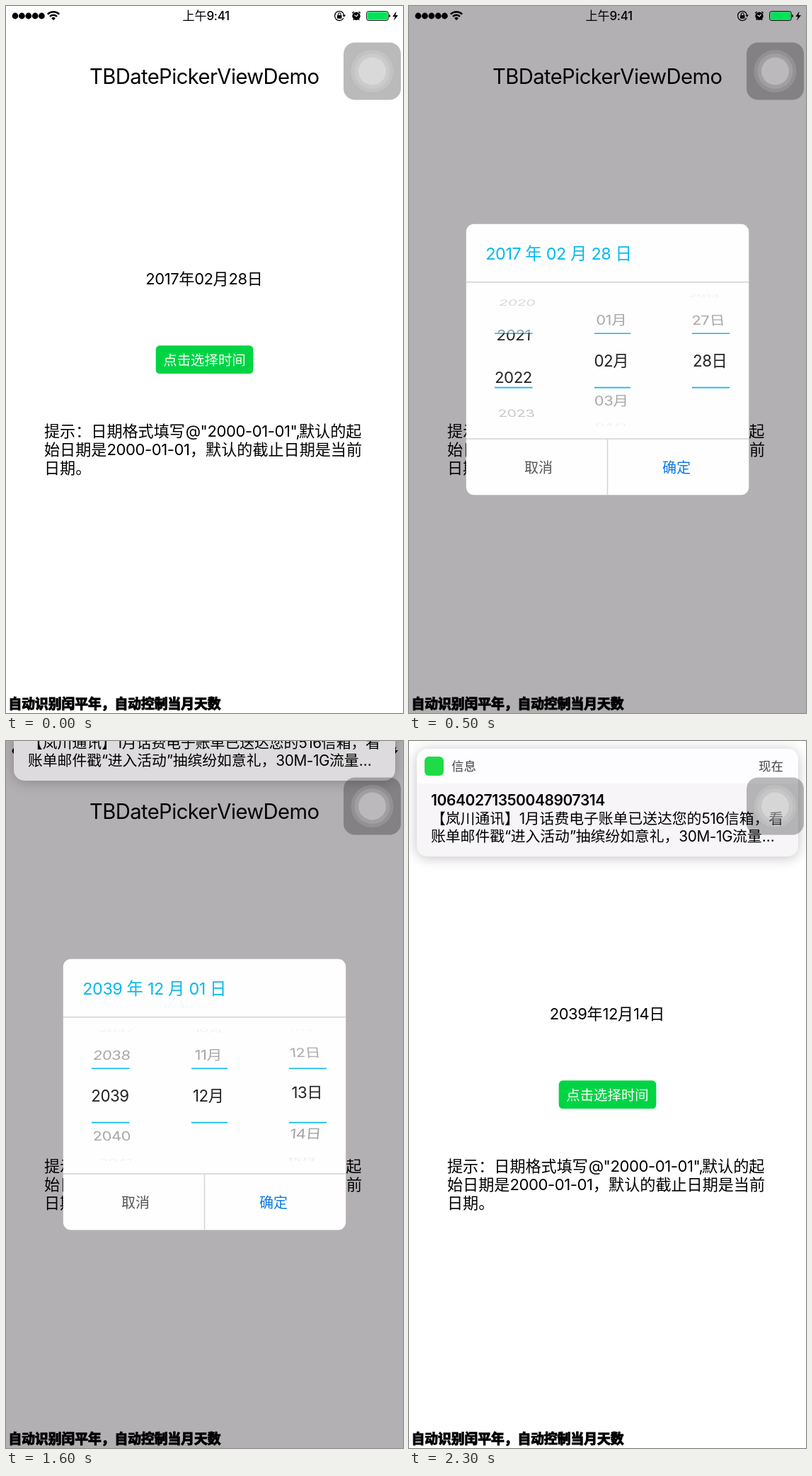
Write an HTML page that moves like this. It is 561x998 px and loops after 2400 ms.

```html
<!DOCTYPE html>
<html lang="zh-CN">
<head>
<meta charset="utf-8">
<title>TBDatePickerViewDemo</title>
<style>
html, body { margin: 0; width: 100%; height: 100%; overflow: hidden; background: #fff; }
svg { display: block; width: 100%; height: 100%; }
text { font-family: "Noto Sans CJK SC", "Noto Sans CJK", sans-serif; white-space: pre; }
.lat { font-family: Inter, "Liberation Sans", sans-serif; letter-spacing: -.02em; }
.mid { text-anchor: middle; }
#banner { filter: drop-shadow(0 2px 9px rgba(10, 0, 10, .24)); }
</style>
</head>
<body>
<svg id="stage" viewBox="0 0 561 998" xmlns="http://www.w3.org/2000/svg"></svg>
<script>
const LOOP = 2400, STEP = 100;
const stage = document.getElementById('stage');

// Latin runs are set in Inter, everything else in the CJK face.
const runs = s => s.replace(/[\x20-\x7e“”…]+/g, m =>
  `<tspan class="lat">${m.replace(/&/g, '&amp;')}</tspan>`);
const text = (x, y, size, s, attrs = '') =>
  `<text x="${x}" y="${y}" font-size="${size}" ${attrs}>${runs(s)}</text>`;
const rect = (x, y, w, h, fill, attrs = '') =>
  `<rect x="${x}" y="${y}" width="${w}" height="${h}" fill="${fill}" ${attrs}/>`;
const disc = (x, y, r, fill, attrs = '') =>
  `<circle cx="${x}" cy="${y}" r="${r}" fill="${fill}" ${attrs}/>`;

const page = `
  ${text(280.2, 109.5, 29.2, 'TBDatePickerViewDemo', 'class="mid"')}
  <g id="chosen"></g>
  ${rect(211.7, 479.3, 137.6, 39.7, '#00d444', 'rx="5.5"')}
  ${text(280.5, 506.5, 19.4, '点击选择时间', 'id="tap" class="mid" fill="#fff" font-weight="300"')}
  ${text(54, 608, 22.1, '提示：日期格式填写')}
  ${text(253.7, 608, 22.1, '@"2000-01-01",')}
  ${text(414, 608, 22.1, '默认的起')}
  ${text(54, 634, 22.1, '始日期是')}
  ${text(142.5, 634, 22.1, '2000-01-01')}
  ${text(260, 634, 22.1, '，默认的截止日期是当前')}
  ${text(54, 660, 22.1, '日期。')}`;

const caption = text(3.5, 992, 18.75, '自动识别闰平年，自动控制当月天数',
  'font-weight="700" stroke="#000" stroke-width="1.1"');

const statusBar = `
  ${[13, 22.4, 31.8, 41.2, 50.4].map(x => disc(x, 14, 4.4, '#000')).join('')}
  <g fill="none" stroke="#000" stroke-width="2.4">
    <path d="M58.8 11.6A11.6 11.6 0 0 1 75.2 11.6M62 14.9A7 7 0 0 1 72 14.9"/>
  </g>
  <path d="M67 20.2l-2.9-3a4.2 4.2 0 0 1 5.8 0z"/>
  ${text(249.5, 20.3, 17, '上午9:41', 'font-weight="500"')}
  <path d="M477 17A6.6 6.6 0 1 1 477.6 12.6" fill="none" stroke="#000" stroke-width="1.3"/>
  <path d="M475.4 12.6h4.6l-2.3 3.2z"/>
  ${rect(468, 13, 6.4, 4.8, '#000', 'rx=".6"')}
  <path d="M469.3 13v-1.3a1.9 1.9 0 0 1 3.8 0V13" fill="none" stroke="#000" stroke-width="1.1"/>
  ${disc(495, 14.2, 5.7, '#000')}
  <path d="M489.3 10l2.3-2M500.7 10l-2.3-2M491.8 18.6l-1 1.2M498.2 18.6l1 1.2"
    stroke="#000" stroke-width="1.5"/>
  <path d="M492.3 12.6l2.9 2.2 2.3-3" fill="none" stroke="#fff" stroke-width="1.1"/>
  ${rect(509.6, 7.6, 30.6, 12.8, 'none', 'rx="2.6" stroke="#000" stroke-width="1"')}
  ${rect(510.6, 8.6, 28.6, 10.8, '#00e359', 'rx="1.5"')}
  <path d="M541.3 11.7a2.4 2.4 0 0 1 0 4.6z"/>
  <path d="M551.6 7.6l-5.4 7.3h3.4l-1.6 5.6 6-7.6h-3.6z"/>`;

const banner = `
  <g id="banner">${rect(11, 11, 539, 152, '#fff', 'id="body" rx="15"')}</g>
  <path id="head" d="M11 60V26a15 15 0 0 1 15-15H535a15 15 0 0 1 15 15V60z"/>
  ${rect(22, 22, 27, 27, '#1fdc46', 'rx="6"')}
  ${text(60, 42.3, 17.4, '信息', 'fill="#444"')}
  ${text(494, 42.3, 17.4, '现在', 'fill="#444"')}
  ${text(31, 91.3, 21, '10640271350048907314', 'font-weight="600"')}
  ${text(31, 117, 20.8, '【岚川通讯】1月话费电子账单已送达您的516信箱，看')}
  ${text(31, 141.5, 20.8, '账单邮件戳“进入活动”抽缤纷如意礼，30M-1G流量…')}`;

const touch = `
  ${rect(477, 51.5, 81, 81, '#000', 'rx="16" opacity=".27"')}
  ${disc(517.5, 92, 30, '#fff', 'opacity=".13"')}
  ${disc(517.5, 92, 25, '#fff', 'opacity=".13"')}
  ${disc(517.5, 92, 19.5, '#fff', 'opacity=".27"')}`;

const dialog = `
  ${rect(80.8, 307.8, 399.4, 382.4, '#fefefe', 'rx="11"')}
  <path d="M81 389.8H480M81 611H480M280.5 611V690" stroke="#d2d2d4" stroke-width="1.4"/>
  <path d="M121 462.2h53.5M262 462.2h51M400 462.2h53M121 538.6h53.5M262 538.6h51M400 538.6h53"
    stroke="#08b8ef" stroke-width="1.6"/>
  <g id="heading"></g>
  <g id="outer" clip-path="url(#rim)" fill="#222"></g>
  <g id="inner" clip-path="url(#lens)" fill="#222"></g>
  ${text(183, 658.5, 20, '取消', 'class="mid" fill="#555"')}
  ${text(378, 658.5, 20, '确定', 'id="ok" class="mid" fill="#0878e6"')}`;

stage.innerHTML = `
  <defs>
    <clipPath id="lens"><rect x="81" y="462" width="399" height="76.6"/></clipPath>
    <clipPath id="rim"><path d="M81 407H480V462H81zM81 538.6H480V593H81z"/></clipPath>
  </defs>
  ${rect(0, 0, 561, 998, '#fff')}
  ${page}
  ${rect(0, 0, 561, 998, '#0a000a', 'id="dim" opacity=".308"')}
  ${caption}
  <g id="status">${statusBar}</g>
  <g id="dialog">${dialog}</g>
  <g id="notice">${banner}</g>
  ${touch}`;

const el = id => document.getElementById(id);
const show = (id, on) => { el(id).style.display = on ? '' : 'none'; };

// Wheel positions over time: [ms, value]
const yearPath = [[400, 2017], [500, 2021.6], [600, 2035.4], [700, 2039]];
const monthPath = [[800, 2], [900, 1.4], [1000, 1], [1100, 7.6], [1200, 12.08], [1300, 12]];
const dayPath = [[600, 28], [700, 20.5], [800, 16], [1100, 16], [1200, 6.45], [1300, 1.7],
  [1400, 1], [1500, 6.5], [1600, 13.07], [1700, 14]];
const bannerPath = [[1500, -185], [1600, -107], [1700, 0]];
// Settled dates: [ms, year, month, day]
const settled = [[0, 2017, 2, 28], [700, 2039, 2, 28], [800, 2039, 2, 16], [1000, 2039, 1, 16],
  [1300, 2039, 12, 16], [1400, 2039, 12, 1], [1700, 2039, 12, 14]];

function along(path, t) {
  if (t <= path[0][0]) return path[0][1];
  for (let i = 1; i < path.length; i++) {
    const [t0, a] = path[i - 1], [t1, b] = path[i];
    if (t <= t1) return a + (b - a) * (t - t0) / (t1 - t0);
  }
  return path[path.length - 1][1];
}

const two = n => String(n).padStart(2, '0');

// Rows of one wheel wrapped round a cylinder, seen with a little perspective.
function wheel(x0, pos, min, max, unit) {
  const R = 97, turn = Math.PI / 5, mid = 285.8, depth = .09;
  let out = '';
  for (let n = Math.ceil(pos - 2.4); n <= pos + 2.4; n++) {
    if (n < min || n > max) continue;
    const a = (n - pos) * turn, c = Math.cos(a), s = Math.sin(a);
    const k = 1 - depth * (1 - c), lean = -(x0 - mid) * depth * s / R;
    const m = [k, 0, lean, c, mid + (x0 - mid) * k, 500.5 + R * s].map(v => v.toFixed(4));
    out += `<g transform="matrix(${m})" data-a="${Math.min(.42, .6 * c * c).toFixed(3)}">` +
      text(0, 8, 22.3, two(n) + unit, 'class="mid"') + '</g>';
  }
  return out;
}

function draw(t) {
  const dimmed = t >= 300 && t < 1900, open = t >= 400 && t < 1900;
  const [, y, m, d] = settled.filter(e => e[0] <= t).pop();
  const date = t < 1900 ? '2017年02月28日' : `${y}年${two(m)}月${two(d)}日`;
  el('chosen').innerHTML = text(280, 393, 22, date, 'class="mid"');
  el('tap').setAttribute('opacity', t === 300 ? .15 : 1);
  show('dim', dimmed);
  show('dialog', open);
  show('status', t < 1700);
  show('notice', t >= 1600);
  el('notice').setAttribute('transform', `translate(0 ${along(bannerPath, t)})`);
  el('body').setAttribute('fill', dimmed ? '#dddbdd' : '#f7f5f8');
  el('head').setAttribute('fill', dimmed ? '#e7e5e9' : '#fdfcfe');
  if (!open) return;

  el('heading').innerHTML = text(108.3, 357.5, 23.4, `${y} 年 ${two(m)} 月 ${two(d)} 日`, 'fill="#05b9ee"');
  const rows = wheel(147, along(yearPath, t), 2000, 2100, '') +
    wheel(286, along(monthPath, t), 1, 12, '月') +
    wheel(425.5, along(dayPath, t), 1, new Date(y, m, 0).getDate(), '日');
  el('inner').innerHTML = rows;
  el('outer').innerHTML = rows.replace(/data-a/g, 'opacity');
  el('ok').setAttribute('opacity', t === 1800 ? .2 : 1);
}

let last = -1;
const start = performance.now();
function tick() {
  const t = Math.floor(((performance.now() - start) % LOOP) / STEP) * STEP;
  if (t !== last) draw(last = t);
  requestAnimationFrame(tick);
}
tick();
</script>
</body>
</html>
```
